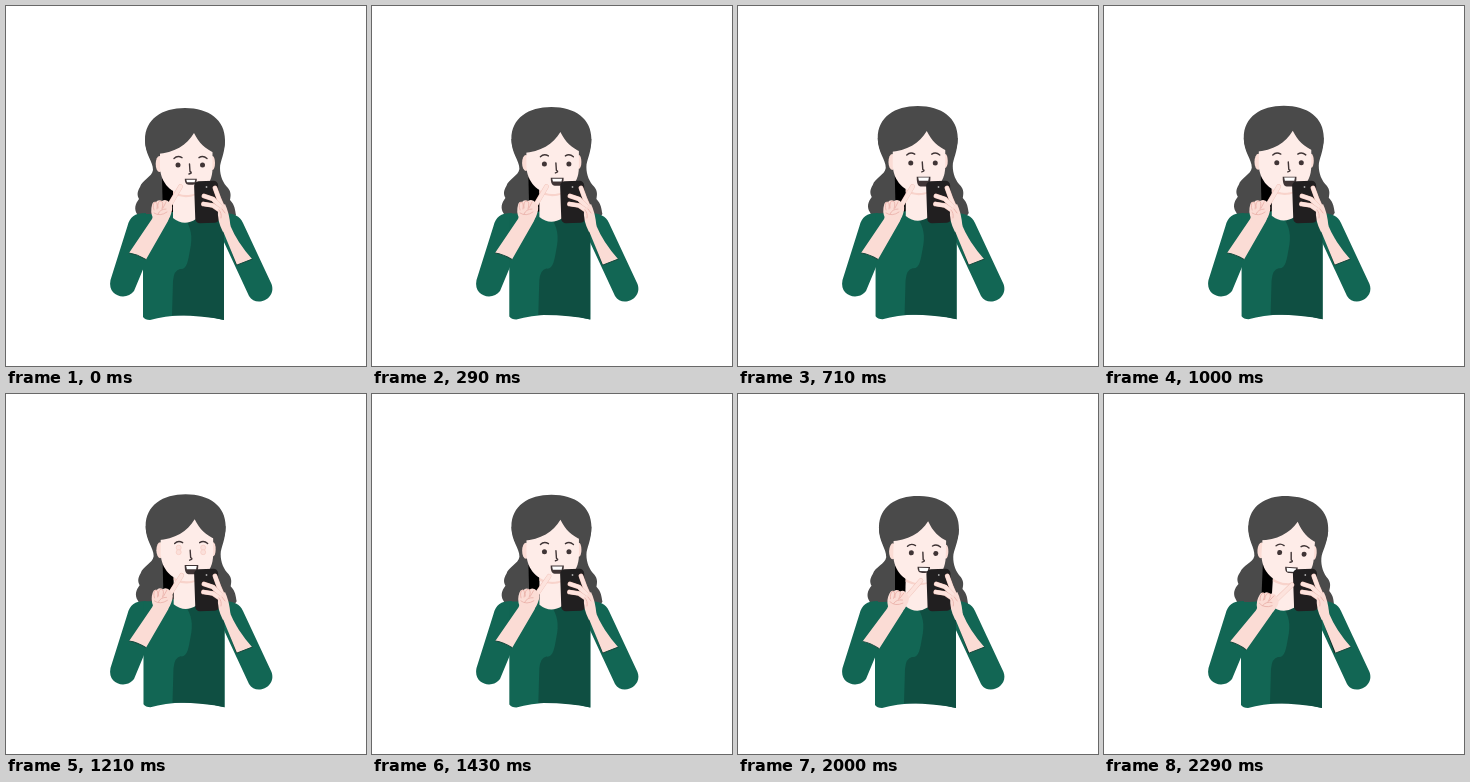
These frames come from a looping animation (360 by 360 pixels, 2.37 s). An HTML page:

```html
<!DOCTYPE html>
<html lang="en">
<head>
<meta charset="utf-8">
<title>Selfie</title>
<style>
html, body { margin: 0; width: 100%; height: 100%; overflow: hidden; background: #fff; }
svg { display: block; width: 100vw; height: 100vh; }
.hair { fill: #4a4a4a; }
.face { fill: #feece8; }
.skin { fill: #fbdcd5; }
.green { fill: #126654; }
.line { fill: none; stroke: #403536; stroke-width: 1.4; stroke-linecap: round; stroke-linejoin: round; }
.crease { fill: none; stroke: #e7aaa2; stroke-width: .7; stroke-linecap: round; }
.cuff { fill: none; stroke: #17483d; }
.edge { stroke: #f0c4bb; stroke-width: 4.8; stroke-linecap: round; fill: none; }
.finger { stroke: #fde3dd; stroke-width: 3.9; stroke-linecap: round; fill: none; }
</style>
</head>
<body>
<svg viewBox="0 0 360 360">
  <g id="backHair">
    <path class="hair" d="M139 134C139 149 147 155 147 164C146 171 136 174 134 181C131 186 131 189 133 193C129 198 128 203 131 208L135 215H226L230 209C229 204 229 199 224 194C225 189 225 186 222 182C217 177 214 170 214 162C214 155 219 148 219 134Z"/>
    <path d="M156 172L169 180V213H157Z"/>
  </g>

  <path class="green" d="M140 207C128 207 124 211 121.5 220L104.5 274C101 291 121 295 128 285L138 261Z"/>
  <path class="green" d="M216 207C228 207 234 210 237 217L265.5 278C271 293 250 302 243 290L217 234Z"/>

  <g id="body">
    <path class="green" d="M137 208Q154 208 167 206H190Q207 208 218 210V314Q198 309 178 309Q158 310 144 314Q139 314 137 311Z"/>
    <path fill="#0f4f42" d="M181 209H218V314Q196 309 166 309.5L167 275Q168 264 174 263C181 264 182 255 184 244C187 231 185 221 179 213Z"/>
  </g>
  <path fill="none" stroke="#102c26" stroke-width="1.4" d="M217.5 221L231 259"/>

  <g id="head">
    <path class="face" d="M167 180H190V213Q178 221 167 212Z"/>
    <path fill="#f8d3cb" d="M167 184Q179 193 190 185V189Q179 194 167 188Z"/>
    <ellipse class="skin" cx="153.5" cy="158" rx="3.8" ry="8"/>
    <ellipse class="skin" cx="206.5" cy="157" rx="2.5" ry="7"/>
    <path class="face" d="M154 138L188 124L206.5 138V163C206 180 195 189 180 189C165 188 155 177 154 162Z"/>
    <path class="hair" d="M139 134C139 113 156 102 179 102C203 102 219 114 219 134C219 141 217 146 215 152Q212 149 209 147C199 143 193 137 188 127C181 139 168 147 151 148L148 160C143 150 139 142 139 134Z"/>
    <path id="brows" class="line" d="M168 152.5Q171.5 149 176 151.7M193 151.7Q197 149 201 152.5"/>
    <path class="line" d="M183.5 158L184 165.5Q187 167 183 168"/>
    <g id="eyes"></g>
    <path id="mouth" fill="#403536"/>
    <path id="teeth" fill="#fff"/>
  </g>

  <g id="phone">
    <rect x="188.7" y="175" width="24" height="42" rx="4.5" fill="#211f20" transform="rotate(-2 200 196)"/>
    <circle cx="200.5" cy="181" r=".9" fill="#aaa"/>
    <path class="skin" d="M231 259L246 253Q231 236 224.5 220L214 206Q214 218 217 225Z"/>
    <path class="cuff" d="M231 259L246.5 253"/>
    <g id="grip"></g>
    <path class="skin" d="M212 203L219 198Q223 206 224.5 220L217 226Q211 215 212 203Z"/>
    <path class="crease" d="M213 204Q216 207 215 212M216 203L219 207"/>
  </g>

  <g id="arm">
    <path class="skin" d="M123 247Q131 248 140 253.5L162 215L165 204L150 202L146 213Z"/>
    <path class="cuff" d="M123 247Q131 248 140 253.5"/>
    <g id="hand">
      <path class="edge" d="M163 200L174.5 180.5"/>
      <path class="finger" d="M162 202L174.5 180.5"/>
      <path class="skin" d="M146 199Q147 195 150 196Q152 193 156 195Q160 192 164 197Q168 200 165 208Q163 215 158 217L147 212Q144 206 146 199Z"/>
      <path class="crease" d="M148 204Q146 198 149 196Q152 196 151 203M152 202Q151 195 155 195Q158 196 156 203M157 202L160 196M148 207Q154 211 161 206M152 208Q154 203 160 203"/>
    </g>
  </g>
</svg>
<script>
const LOOP = 2370, STEP = 71.5, LAST = 32;
const el = id => document.getElementById(id);
const place = (id, value) => el(id).setAttribute("transform", value);
const clamp = x => Math.max(0, Math.min(1, x));
const progress = (t, from, to) => clamp((t - from) / (to - from));

const finger = d => `<path class="edge" d="${d}"/><path class="finger" d="${d}"/>`;
el("grip").innerHTML = ["M209 182L213 193L217 202", "M198 190L207 193L215 201", "M197.5 198L207 199.5L215 205"]
  .map(finger).join("");

const eyeDot = (x, y) => `<circle cx="${x}" cy="${y}" r="2.5"/>`;
const openEyes = eyeDot(172, 159) + eyeDot(196.5, 159);
const shutEyes = `<g fill="#fbe0db" stroke="#f6cdc5" stroke-width=".8">` +
  [172, 196.5].map(x => eyeDot(x, 155.5) + eyeDot(x, 160)).join("") + "</g>";
el("eyes").setAttribute("fill", "#403536");

function drawMouth(open, smile) {
  const w = 6 + open * .9 + smile * .3, h = 6 + open * 4, teeth = 2.6 + open * .7 + smile;
  const left = 184.8 - w, right = 184.8 + w, top = 172.8, base = top + h;
  el("mouth").setAttribute("d",
    `M${left} ${top}H${right}C${right} ${base - 1} ${right - 2} ${base} ${right - 5} ${base}` +
    `H${left + 5}C${left + 2} ${base} ${left} ${base - 1} ${left} ${top}Z`);
  el("teeth").setAttribute("d",
    `M${left + 1.5} ${top + .9}H${right - 1.5}L${right - 2.2} ${top + .9 + teeth}H${left + 2.2}Z`);
}

function draw(time) {
  const step = Math.min(LAST, Math.floor((time % LOOP + 7) / STEP));
  const t = step * STEP;
  const open = Math.sin(Math.PI * progress(t, 0, 1760));
  const lean = progress(t, 1700, 2290) ** 1.5;
  const swing = progress(t, 0, 2290) ** 5;
  const curl = progress(t, 1000, 2290);

  const headPose = `translate(${open * .8} ${open * -2.2}) rotate(${lean * 3.8} 180 214)`;
  place("head", headPose);
  place("backHair", headPose);
  place("brows", `translate(0 ${open * -1.5})`);
  place("body", `translate(${open * .6} ${open * -.8})`);
  place("phone", `translate(${lean * .8} 0)`);
  place("arm", `rotate(${swing * 5.5} 116 278)`);
  place("hand", `rotate(${curl * 10} 155 210)`);

  el("eyes").innerHTML = step >= 16 && step <= 18 ? shutEyes : openEyes;
  drawMouth(open, curl);
}

function tick() {
  draw(performance.now());
  requestAnimationFrame(tick);
}
tick();
</script>
</body>
</html>
```
